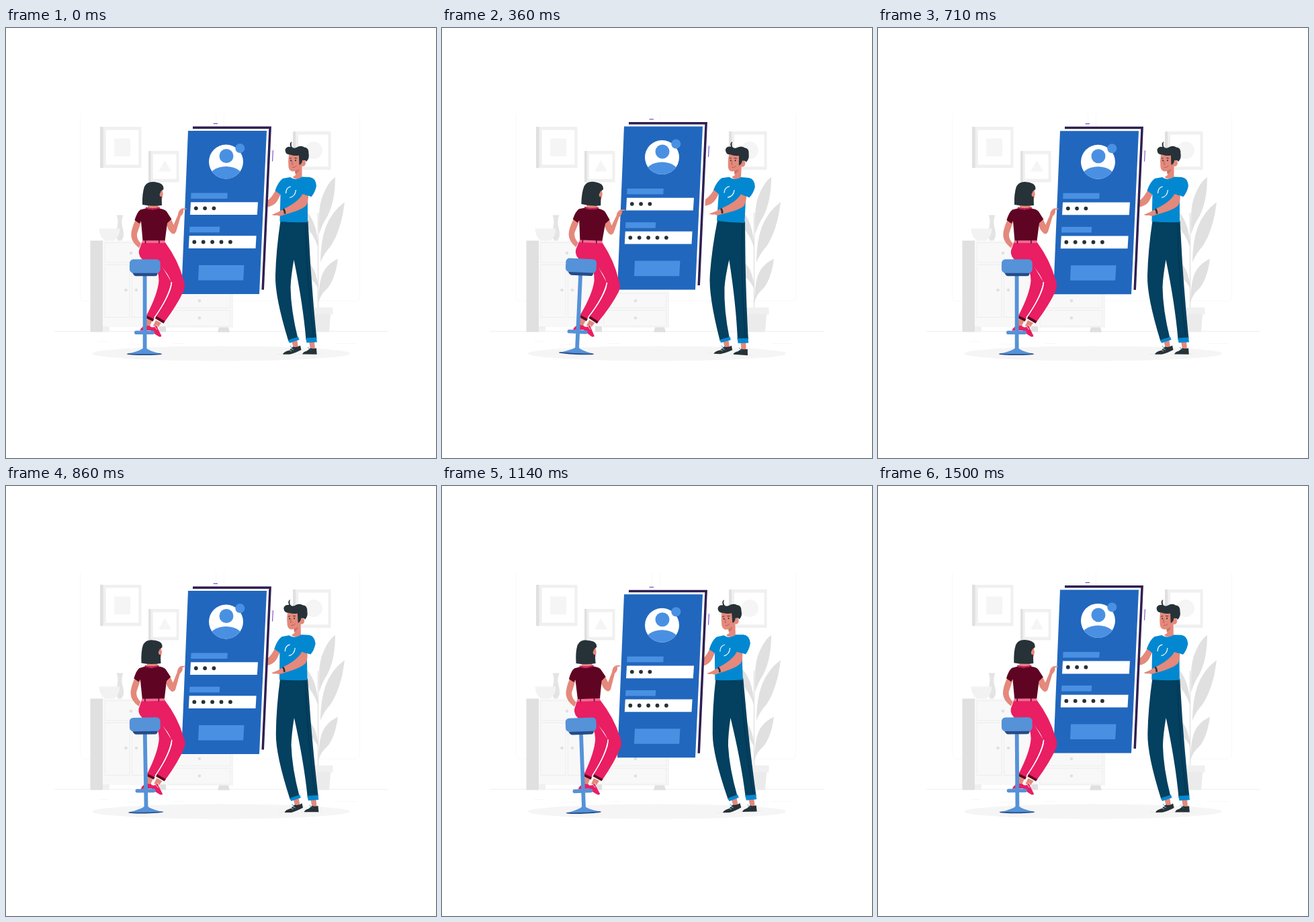
An HTML page with a canvas that plays this animation: 640 px wide and 640 px high, repeating every 1570 ms.

```html
<!DOCTYPE html>
<html lang="en">
<head>
<meta charset="utf-8">
<title>Sign-in scene</title>
<style>
html, body { margin: 0; width: 100%; height: 100%; overflow: hidden; background: #fff; }
canvas { display: block; width: 640px; height: 640px; }
</style>
</head>
<body>
<canvas id="stage"></canvas>
<script>
const canvas = document.getElementById('stage');
const ctx = canvas.getContext('2d');
const ratio = window.devicePixelRatio || 1;
canvas.width = canvas.height = 640 * ratio;

const LOOP = 1570, STEPS = 22;
const SKIN = '#e4897b', INK = '#263238', WINE = '#5f0423', PINK = '#e91e63';
const NAVY = '#04405f', SHIRT = '#0288d1', SCREEN = '#2167be', LIGHT = '#4a90e2';
const STOOL = '#5592d8', DEEP = '#264b88', FRAME = '#2f1f52';
const GREY = '#e0e0e0', PALE = '#f0f0f0', FAINT = '#f5f5f5';

// Keys are [time in ms, value]
const phoneKeys = [[0, 0], [334, -6.9], [1140, 8.3], [LOOP, 0]];
const leanKeys = [[0, 0], [210, 1.85], [325, 2.9], [500, 1.45], [710, 0],
  [860, -0.95], [1140, -2.1], [1500, -0.4], [LOOP, 0]];

function valueAt(keys, t) {
  const i = Math.max(1, keys.findIndex(k => k[0] >= t));
  const [t0, a] = keys[i - 1], [t1, b] = keys[i];
  return a + (b - a) * (t - t0) / (t1 - t0);
}

function fill(color, d) {
  ctx.fillStyle = color;
  ctx.fill(new Path2D(d));
}
function line(color, width, d, cap = 'butt') {
  ctx.strokeStyle = color;
  ctx.lineWidth = width;
  ctx.lineCap = cap;
  ctx.stroke(new Path2D(d));
}
function box(color, x0, y0, x1, y1, radius = 0) {
  ctx.fillStyle = color;
  ctx.beginPath();
  ctx.roundRect(x0, y0, x1 - x0, y1 - y0, radius);
  ctx.fill();
}
function outline(x0, y0, x1, y1) {
  ctx.strokeStyle = '#ededed';
  ctx.lineWidth = 1;
  ctx.strokeRect(x0, y0, x1 - x0, y1 - y0);
}
function oval(color, x, y, rx, ry = rx) {
  ctx.fillStyle = color;
  ctx.beginPath();
  ctx.ellipse(x, y, rx, ry, 0, 0, Math.PI * 2);
  ctx.fill();
}
function leaning(x, y, degrees, draw) {
  ctx.save();
  ctx.translate(x, y);
  ctx.rotate(degrees * Math.PI / 180);
  ctx.translate(-x, -y);
  draw();
  ctx.restore();
}

function picture(x0, y0, x1, y1, strip) {
  box(PALE, x0, y0, x1, y1);
  box(GREY, x0, y0, x0 + strip, y1);
  box('#fff', x0 + strip * 1.9, y0 + 4.7, x1 - 4, y1 - 4.7);
}

function drawRoom() {
  line('#f8f8f8', 1, 'M110.5 128V401Q111 406 116 406H521Q526 406 526.5 401V128M312.5 128V150M324.5 128V150');
  line('#efefef', 1, 'M72 451.5H568');
  line('#f7f7f7', 1, 'M137 466.5H152M180 470.5H200M249 469.5H266M490 469.5H521');
  oval(FAINT, 320, 484.5, 192, 11);

  picture(140, 147, 201.5, 208.3, 4.6);
  box(FAINT, 161, 164.5, 185, 191);
  picture(212, 183, 257.5, 229.5, 3.6);
  fill(FAINT, 'M236.5 197L246 213.5H227Z');
  picture(427, 154, 483.5, 211, 4.2);
  oval(FAINT, 458, 182, 13);

  // Cabinet and drawers
  box('#f8f8f8', 144, 316.5, 240, 445);
  box('#f8f8f8', 238, 392, 337, 446);
  box(GREY, 125.5, 316.5, 144, 452.5);
  box(PALE, 144, 444, 154, 452.5);
  box(GREY, 228, 444, 238, 452.5);
  fill(GREY, 'M317 445.5H331L333 452.8H315Z');
  outline(147, 319.5, 235, 349);
  outline(147, 352.5, 184, 430.5);
  outline(187.5, 352.5, 235, 430.5);
  outline(241, 395, 334, 416.5);
  outline(241, 420, 334, 444);
  line('#ededed', 1, 'M337 392V446');
  for (const [x, y] of [[186, 335], [178.5, 390], [194, 390], [288, 406], [288, 431.5]]) oval(GREY, x, y, 2.3);

  fill('#e4e4e4', 'M164.5 278.5H174.5Q171 288 173 295Q178 312 171 316.5H167Q162 311 165.5 296Q168 287 164.5 278.5Z');
  fill('#f2f2f2', 'M138.5 298.5H169.5Q169 311 161 316.5H147Q139 311 138.5 298.5Z');

  // Plant
  line(GREY, 1.3, 'M464.5 275V418');
  fill(GREY, 'M490 222Q479 229 470 253Q464 273 466 307Q471 291 478 281Q490 258 490 222Z'
    + 'M504 259Q485 273 476 296Q468 318 468 349Q473 336 483 325Q499 301 504 259Z'
    + 'M494 343.5Q474 353 469 372Q465 386 465 409Q468 396 478 388Q490 374 494 343.5Z'
    + 'M444 270Q463 285 465 329Q461 314 452 302Q445 291 444 270Z'
    + 'M441 341Q463 354 465 389Q460 378 452 371Q443 360 441 341Z');
  box(PALE, 449, 416, 486.5, 426.5, 1);
  fill('#ebebeb', 'M453 426H483L481 452.5H455Z');
}

function drawMan() {
  line('#ececec', 1, 'M403 485.5H414M436 485.5H443M462 485.5H468');
  // Feet
  fill(SKIN, 'M425 465L433 463L435 475L428 477ZM451 466H459L460 479H453Z');
  fill(INK, 'M412 485.8Q413 482 421 480L427 474.5Q433 476 438 472.5L439.5 479Q430 484 422 485.8Z'
    + 'M441 485.5Q442 482 448 480.5L453 476.5Q457 478 462 476.5L462.7 485.8Z');
  line('#fff', 0.7, 'M421 479L425 481M424 477L428 479');
  line(SHIRT, 0.8, 'M423 473L428 479M449 475L454 480');

  // Trousers
  fill(NAVY, 'M408.5 287H449.5L453 350Q458 421 462.5 462.5L446.5 463.5Q442 411 428.5 345'
    + 'Q424 370 423.5 386Q424 420 434.5 462L420.5 466.5Q400 400 401 368Q402 330 408.5 287Z');
  line('#033048', 0.8, 'M446 291Q447 370 458 462');
  fill(SHIRT, 'M420 464.5L435 459.5L436.5 464L422 469ZM446 461.5L462 460.5L463 467.5L447.5 468.5Z');

  // Far arm, head and neck
  fill(SKIN, 'M401.5 241Q396 252 389 257V266.5Q399 265 404 257L410 245Z');
  fill(SKIN, 'M430.5 207L440.5 202V223Q434 228 426.5 222L431 219Z');
  fill('#ce6f64', 'M430 212L436.5 209Q436 215 430.5 217Z');
  fill(SKIN, 'M421 188Q419.5 198 420.5 207Q422 214 428 213.5Q436 212 440 205L441 189L430 185Z');
  oval(SKIN, 442, 201, 4, 5);
  fill(INK, 'M425.5 169Q421 171 423.5 177Q417 176 415.5 181.5Q416 189 423 188.5'
    + 'Q430 191 436 189.5L436.5 204Q441 202 441 197Q446 196 447 199Q452 194 450.5 187'
    + 'Q451 178 444 177.5Q439 174 432 178Q427 180 425 176Q424 172 425.5 169Z');
  oval(INK, 424.2, 197.3, 0.9, 1.2);
  oval(INK, 431, 197, 0.9, 1.2);
  line(INK, 0.9, 'M421.8 194.2L425 193.5M429 193.4L433 193.8');
  line('#b65a50', 0.9, 'M426.5 198L425.3 203H427.5M426 207.5Q430 208 432.5 205');

  // T-shirt
  fill(SHIRT, 'M423 222Q431 228 441 221.5L452 222Q461 223 462 235Q460 245 454.5 251L449 249V289'
    + 'Q428 290 407.5 288L408.5 248L400.5 242Q405 229 412 224Z');
  line('#fff', 1.2, 'M416.5 246Q417 237 424 236M431.5 241Q430.5 251 422 252.5');
  line('#0277b8', 0.7, 'M448.5 249Q443 244 442 238');

  // Pointing arm
  fill(SKIN, 'M441.5 247Q435 259 413 269.5L405 274L396 277.8Q396.5 279.5 404 278.7Q407 281 414 278'
    + 'Q443 270 447.5 263Q450 257 450 250Z');
  fill(SHIRT, 'M440 242L446 234L457 237L454.5 251Q446 249 440 245Z');
  line(INK, 2.6, 'M412.7 269.3Q415.5 272 415 276.7');
}

function drawPhone() {
  fill('#fff', 'M278 148H393L382 389.5L377 394L388 153H278Z');
  line(FRAME, 3.5, 'M278 148.3H393.1L382.2 389.5');
  line('#6a55c2', 1.2, 'M308.5 142.3H315');
  line('#7e5bd0', 1.2, 'M397.4 182L396.5 198.5');
  fill(SCREEN, 'M271 153H388L377 396H261Z');

  ctx.save();
  ctx.beginPath();
  ctx.arc(327.5, 199, 25.5, 0, Math.PI * 2);
  ctx.clip();
  box('#fff', 300, 170, 356, 228);
  oval(LIGHT, 327.5, 226, 27, 20);
  ctx.restore();
  oval(LIGHT, 328, 190.5, 10.5);
  oval(LIGHT, 348.3, 179, 7);

  fill(LIGHT, 'M275.6 245.5H329.8L329.3 254H275.2ZM273.4 295.7H318.2L317.7 304.2H273Z'
    + 'M287 353H354.4L353.2 375.6H286Z');
  fill('#fff', 'M275 259.2H375L373.8 278H274ZM272.8 309.3H372.6L371.5 328H271.8Z');
  for (let i = 0; i < 3; i++) oval(INK, 282.8 + i * 13.3, 268.3, 2.9);
  for (let i = 0; i < 5; i++) oval(INK, 280.3 + i * 13.4, 318.5, 2.9);
}

function drawWoman() {
  // Feet and legs
  fill(SKIN, 'M210 432L218 435L213 445L207 442ZM223 435L231 439L226 446L219 443Z');
  fill(PINK, 'M205 440.5Q209 444 214 443Q217 448 224 443L231.5 458.5Q230 460.5 227 459'
    + 'Q220 455 215 450L199.5 450.5Q200 447 203.5 445Z');
  line('#fff', 0.8, 'M221 444L225 449M224 442L227 447');
  fill(PINK, 'M222 338L246 378Q242 400 219 434L208.5 429Q226 396 227.5 376Q228 360 215 345Z');
  line(WINE, 3.8, 'M209.2 430L219.5 435');
  fill(PINK, 'M202.5 318.5H236.5Q256 345 264 374Q268 383 264.5 391Q255 412 235.5 438'
    + 'L222.5 430Q241 402 246 386Q248 379 240 366L228 350L207 348Q196 340 198 331Z');
  line('#fff', 1.5, 'M246.5 378Q245 397 221 431');
  line(WINE, 3.8, 'M222.8 430.5L235.5 438');

  // Arms
  fill(SKIN, 'M192.5 286Q186 300 186.3 309Q187 319 198 327.5L201 321Q194 314 195 306L201 289Z');
  fill(SKIN, 'M238 289Q240 300 246.5 305.5Q250.5 308 253 303.5L260 280Q265 276 264 270.5L268.5 269.7'
    + 'V268.3L262 268.5Q256.5 271 256 278L249.5 293L245.5 284Z');

  // Head and top
  fill(SKIN, 'M211 258H227V270H211ZM227 240H232.5L233.8 247.5L232 255Q231 259 225 258Z');
  fill(WINE, 'M208 268.5Q218 272 228 268.5Q236 269.5 239 273L246.3 284.5L240 290.5L236.5 317H203.5'
    + 'L201 287.5L198.5 291L191.5 286Q195 274 200 270.5Z');
  line('#c2185b', 2.2, 'M208 267.5Q218 271 229 267.5');
  fill(INK, 'M203 263Q202.5 246 206 236Q210 228.5 219 229Q226 229.5 230 231.5Q235 234 234.5 240'
    + 'L230.5 243Q229 246 231.5 248.5L232 264Q217 266 203 263Z');
  oval(SKIN, 230.5, 248, 1.8, 3);
  fill('#f06a93', 'M203 316.3H236.5V320H202.5Z');
  line(WINE, 1.5, 'M207.5 315.5V320.5M228 315.5V320.5');

  // Stool
  box(STOOL, 203.7, 368, 209.5, 480);
  box(STOOL, 191, 450.4, 221, 456, 2.8);
  oval(DEEP, 206, 485.2, 26.3, 1.9);
  fill(STOOL, 'M203.5 477H209.5Q212 480 229 484.7Q206 486 183 484.7Q200 480 203.5 477Z');
  fill(DEEP, 'M188 363H225.5V366Q225 369.3 221.5 369.3H193Q189 368 188 363Z');
  box(STOOL, 184, 344.3, 229.7, 364.7, 5.5);
}

function render(now) {
  // The scene holds each pose for one step.
  const step = Math.floor((now % LOOP + 5) * STEPS / LOOP) % STEPS;
  const t = step * LOOP / STEPS;
  const lean = valueAt(leanKeys, t);
  ctx.setTransform(ratio, 0, 0, ratio, 0, 0);
  box('#fff', 0, 0, 640, 640);
  drawRoom();
  leaning(430, 320, lean, drawMan);
  ctx.save();
  ctx.translate(0, valueAt(phoneKeys, t));
  drawPhone();
  ctx.restore();
  leaning(227, 357, lean, drawWoman);
}

let start;
function tick(now) {
  start ??= now;
  render(now - start);
  requestAnimationFrame(tick);
}
render(0);
requestAnimationFrame(tick);
</script>
</body>
</html>
```
